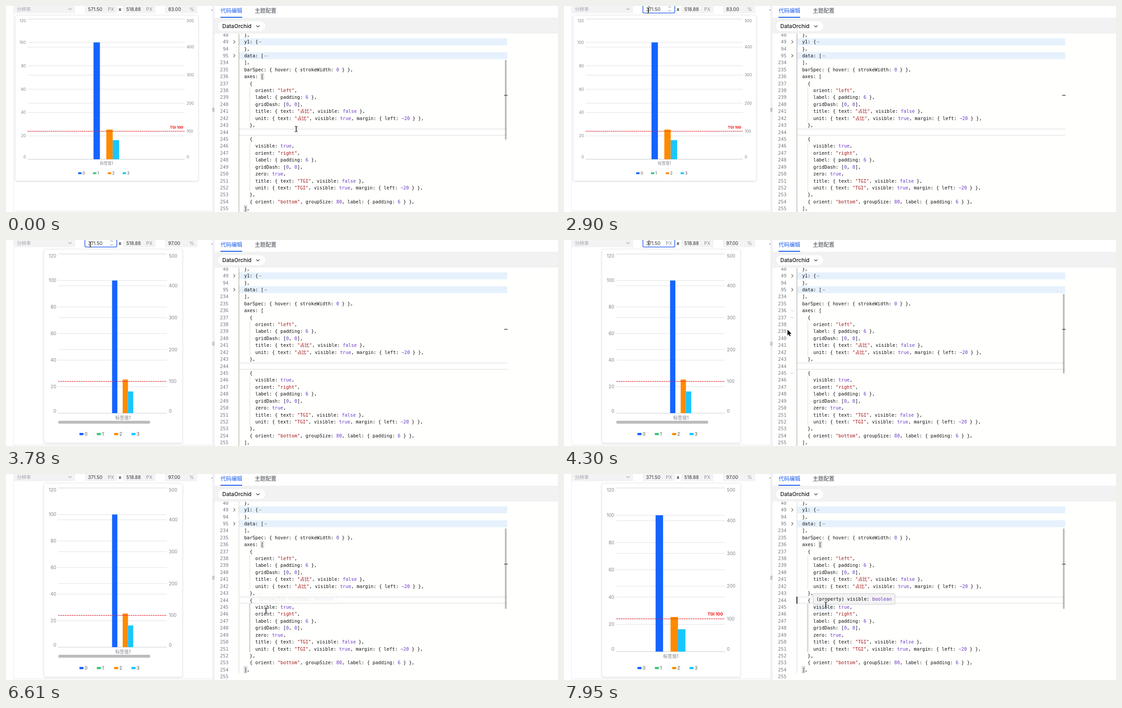
Animation, 1225 px wide and 457 px high, one loop 8000 ms. Source, as an HTML page with a canvas:

```html
<!DOCTYPE html>
<html lang="zh">
<head>
<meta charset="utf-8">
<style>
html, body { margin: 0; width: 100%; height: 100%; overflow: hidden; background: #fff; }
canvas { display: block; }
</style>
</head>
<body>
<canvas id="stage" width="1225" height="457"></canvas>
<script>
const ctx = document.getElementById('stage').getContext('2d');
const LOOP = 8000, STEP = 60;
const UI = 'Inter, "Noto Sans CJK SC", "Noto Sans CJK", sans-serif';
const MONO = '10.3px "DejaVu Sans Mono", "Noto Sans CJK SC", "Noto Sans CJK", monospace';
const ROW = 15.42, FIRST_ROW = 64, COL = 6.2, CODE_X = 516;
const PURPLE = '#6a38c8', BLUE = '#1664ff';

// Moments at which the state changes
const T = { focus: 1560, select: 2480, type: 2900, resize: 3070, leave: 3800,
            click: 4850, remove: 5950, rebuild: 7009 };

const HEAD = ['},', 'y1: {', '},', 'data: [', '],',
  'barSpec: { hover: { strokeWidth: 0 } },', 'axes: [', '  {', '    orient: "left",',
  '    label: { padding: 6 },', '    gridDash: [0, 0],',
  '    title: { text: "占比", visible: false },',
  '    unit: { text: "占比", visible: true, margin: { left: −20 } },', '  },'];
const TAIL = ['  {', '    visible: true,', '    orient: "right",', '    label: { padding: 6 },',
  '    gridDash: [0, 0],', '    zero: true,', '    title: { text: "TGI", visible: false },',
  '    unit: { text: "TGI", visible: true, margin: { left: −20 } },', '  },',
  '  { orient: "bottom", groupSize: 80, label: { padding: 6 } },', '],'];

const SERIES = [['0', BLUE, 100], ['1', '#3cc780', 0], ['2', '#ff8a00', 25.4], ['3', '#1ac6ff', 16.4]];
const WIDE = { card: [20.5, 20.5, 406, 367.5], x0: 48, x1: 397, top: 29, base: 340, size: 8.57,
  bar: 194.2, barW: 14.2, cat: [223, 349], legend: [160, 371, 32.9], mark: [393.5, 268.7], zoom: '83.00' };
const NARROW = { card: [84, 20.5, 307.5, 429.5], x0: 116, x1: 357, top: 31, base: 384.3, size: 10,
  bar: 235.4, barW: 11.75, cat: [259.5, 394.3], legend: [163, 430.5, 38.5], slider: true, zoom: '97.00' };
const REBUILT = { ...NARROW, base: 394, bar: 203.3, barW: 16.55, cat: [237, 404.5],
  slider: false, mark: [353, 311] };

const POINTER = [[0, 644, 273], [470, 644, 273], [590, 677, 298], [830, 677, 298], [1200, 390, 170],
  [1590, 184, 10], [1760, 187, 10], [3780, 187, 10], [4040, 350, 90], [4300, 496, 199],
  [4600, 570, 284], [4750, 561, 283], [6190, 561, 283], [6310, 577, 303], [6720, 577, 303],
  [7010, 549, 268], [7200, 549, 268], [7470, 581, 290], [LOOP, 581, 290]];

const clamp = v => Math.max(0, Math.min(1, v));
const ramp = (t, from, to) => clamp((t - from) / (to - from));
const stepped = (t, from, to) => ramp(from + Math.floor((t - from) / STEP) * STEP, from, to);
const mix = (a, b, p) => a + (b - a) * p;
const blinkOn = (t, start) => Math.floor((t - start) / 500) % 2 === 0;

function rect(x, y, w, h, color) {
  ctx.fillStyle = color;
  ctx.fillRect(x, y, w, h);
}
function round(x, y, w, h, r, fill, stroke, lw = 1) {
  ctx.beginPath();
  ctx.roundRect(x, y, w, h, r);
  if (fill) { ctx.fillStyle = fill; ctx.fill(); }
  if (stroke) { ctx.strokeStyle = stroke; ctx.lineWidth = lw; ctx.stroke(); }
}
function path(points, color, lw = 1) {
  ctx.beginPath();
  points.forEach(([x, y]) => ctx.lineTo(x, y));
  ctx.strokeStyle = color;
  ctx.lineWidth = lw;
  ctx.stroke();
}
function text(s, x, y, font, color, align = 'left') {
  ctx.font = font;
  ctx.fillStyle = color;
  ctx.textAlign = align;
  ctx.textBaseline = 'alphabetic';
  ctx.fillText(s, x, y + parseFloat(font.match(/[\d.]+px/)[0]) * 0.36);
}
function chevron(x, y, r, color, lw = 1, right = false) {
  path(right ? [[x - r / 2, y - r], [x + r / 2, y], [x - r / 2, y + r]]
             : [[x - r, y - r / 2], [x, y + r / 2], [x + r, y - r / 2]], color, lw);
}
function faded(alpha, draw) {
  if (alpha <= 0) return;
  ctx.save();
  ctx.globalAlpha = alpha;
  draw();
  ctx.restore();
}

function pointerAt(t) {
  const i = POINTER.findIndex(p => p[0] > t);
  const [t0, x0, y0] = POINTER[i - 1], [t1, x1, y1] = POINTER[i];
  const p = stepped(t, t0, t1);
  return [mix(x0, x1, p), mix(y0, y1, p)];
}

function drawInput(x, value, unit) {
  rect(x, 0, 71.5, 16, '#f3f3f4');
  text(value, x + 7, 6.8, `10.4px ${UI}`, '#333');
  if (unit) text(unit, x + (unit === '%' ? 54 : 51), 6.8, `10.4px ${UI}`, '#8a8f99');
}

function drawToolbar(t, layout, mouse) {
  rect(16, 0, 137.5, 16, '#f3f3f4');
  text('分辨率', 24, 6.8, `10.33px ${UI}`, '#a2a5ab');
  chevron(142, 6.8, 3.6, '#777');

  const hover = mouse[0] > 175 && mouse[0] < 246 && mouse[1] < 16;
  const focused = t >= T.focus && t < T.click;
  const width = t < T.type ? '571.50' : '371.50';
  drawInput(175, width, hover ? '' : 'PX');
  drawInput(260, '518.88', 'PX');
  drawInput(353, layout.zoom, '%');
  text('x', 253, 6.8, `600 10.4px ${UI}`, '#222', 'center');
  rect(456.5, 8, 1.8, 1.8, '#444');

  if (focused) {
    faded(mix(0.5, 1, ramp(t, T.focus, 1700)), () =>
      round(175.2, -4, 70.6, 19.6, 2, '#fff', '#2b63f0', 1.5));
    if (t >= T.select && t < T.type) rect(182, 0, 6.6, 13.5, '#b3d4fd');
    text(width, 182, 6.8, `10.4px ${UI}`, '#333');
    if (!hover) text('PX', 226, 6.8, `10.4px ${UI}`, '#8a8f99');
    const caretOn = t < T.select ? blinkOn(t, T.focus) : t >= T.type && blinkOn(t, T.type);
    if (caretOn) rect(t < T.select ? 182 : 188, 0, 1, 13, '#111');
  }
  if (hover) {
    path([[231.5, 4], [234.5, 1], [237.5, 4]], '#777');
    path([[231.5, 9], [234.5, 12], [237.5, 9]], '#777');
  }
}

function drawBars(t, c) {
  let { bar, barW, base, top } = c, grow = 1;
  if (c === NARROW) {
    // Bars travel from the rescaled wide layout to the narrow one
    const p = stepped(t, T.resize, T.resize + 320);
    bar = mix(286.4, bar, p);
    barW = mix(16.6, barW, p);
    base = mix(394.5, base, p);
    top = mix(31, top, p);
  }
  if (c === REBUILT) grow = Math.max(0.006, stepped(t, T.rebuild, T.rebuild + 300));
  ctx.save();
  ctx.beginPath();
  ctx.rect(c.x0, c.top, c.x1 - c.x0, c.base - c.top);
  ctx.clip();
  SERIES.forEach(([, color, value], i) => {
    const h = (base - top) * value / 120 * grow;
    rect(bar + i * barW, base - h, barW, h, color);
  });
  ctx.restore();
}

function drawChart(t, c) {
  const font = `${c.size}px ${UI}`, k = c.size / 10;
  ctx.save();
  ctx.shadowColor = 'rgba(0,0,0,0.16)';
  ctx.shadowBlur = 4;
  ctx.shadowOffsetY = 1;
  round(...c.card, 4, '#fff');
  ctx.restore();
  round(...c.card, 4, null, '#e8e8ea', 0.8);

  const height = c.base - c.top;
  const axis = (max, step, x, align) => {
    for (let v = 0; v <= max; v += step) {
      const y = c.base - height * v / max;
      path([[c.x0, y], [c.x1, y]], v ? '#dfe0e3' : '#d5d7da', 1);
      const shift = v === 0 ? -5.4 * k : v === max ? 4.7 * k : 0;
      text(v, x, y + shift, font, '#7d8088', align);
    }
  };
  axis(120, 20, c.x0 - 4.5 * k, 'right');
  axis(500, 100, c.x1 + 4.6 * k, 'left');
  drawBars(t, c);

  const markY = c.base - height / 5;
  ctx.save();
  ctx.setLineDash([3.34 * k, 1.67 * k]);
  path([[c.x0, markY], [c.x1, markY]], '#e6202a', 1.35 * k);
  ctx.restore();
  if (c.mark) text('TGI 100', ...c.mark, `bold ${9.4 * k}px ${UI}`, '#f01818', 'right');

  text('标签值1', ...c.cat, font, '#7d8088', 'center');
  if (c.slider) round(116, 401, 204, 6.4, 3.2, '#bcbcbc');
  const [lx, ly, gap] = c.legend;
  SERIES.forEach(([name, color], i) => {
    round(lx + i * gap, ly - 2.4 * k, 9 * k, 4.8 * k, 0.8, color);
    text(name, lx + i * gap + 11.6 * k, ly, font, '#555');
  });
}

function drawHeader() {
  rect(458, 0, 5, 457, '#f0f1f3');
  for (let i = 0; i < 6; i++) rect(458.2 + (i % 2) * 2.6, 226.4 + (i >> 1) * 3, 1.4, 1.4, '#555');
  rect(463, 0, 762, 26, '#fff');
  text('代码编辑', 476.3, 10.3, `500 12px ${UI}`, '#1a5cf0');
  text('主题配置', 552, 10.3, `12px ${UI}`, '#41464f');
  rect(463, 26, 762, 35.5, '#f2f2f3');
  rect(476, 24, 48, 2, '#1a5cf0');
  round(471, 34, 104, 21.5, 10.7, '#fff');
  text('DataOrchid', 480, 45, `500 12px ${UI}`, '#15171c');
  chevron(559, 45, 3.4, '#333', 1.3);
}

function drawCode(line, x, y) {
  ctx.font = MONO;
  for (const [token] of line.matchAll(/"[^"]*"|\b(?:true|false|boolean)\b|−?\b\d+|[A-Za-z]\w*|./g)) {
    const color = token[0] === '"' ? '#a31515'
      : /^(true|false|boolean|−?\d+)$/.test(token) ? PURPLE : '#111';
    text(token, x, y, MONO, color);
    x += ctx.measureText(token).width;
  }
}

function drawEditor(t) {
  const removed = t >= T.remove;
  const rows = [...HEAD, ...(removed ? [] : ['']), ...TAIL, ...(removed ? [''] : [])];
  const rowY = i => FIRST_ROW + i * ROW;
  const focused = t < T.focus || t >= T.click;

  ctx.save();
  ctx.beginPath();
  ctx.rect(463, 61.5, 762, 396);
  ctx.clip();
  rect(463, 61, 762, 396, '#fffffe');

  for (const i of [1, 3]) {
    rect(517, rowY(i) - ROW / 2, 595.5, ROW, '#e6f1fd');
    chevron(506.5, rowY(i), 3.6, '#555', 1.1, true);
  }
  for (const edge of [0.8, ROW - 0.8])
    rect(517, rowY(14) - ROW / 2 + edge - 0.8, 595.5, 1.6, '#e6e6e6');

  const guide = (x, from, to, active) =>
    rect(x, rowY(from) - ROW / 2, 1, (to - from + 1) * ROW, active ? '#939393' : '#d6d6d6');
  guide(516.4, 0, removed ? 24 : 25, !removed);
  guide(540.6, 8, 12, false);
  guide(540.6, removed ? 15 : 16, removed ? 21 : 22, removed);

  if (focused) {
    const bracket = (col, i) =>
      round(CODE_X + col * COL, rowY(i) - 7.3, 6.2, 14.4, 0, '#ececec', '#b9b9b9', 0.9);
    bracket(8, 6);
    bracket(2, removed ? 24 : 25);
  }

  const tip = Math.max(ramp(t, 6600, 6700) - ramp(t, 6740, 6840), ramp(t, 7800, 7940));
  if (removed) faded(tip, () => rect(553.2, rowY(15) - ROW / 2, 43.4, ROW, '#eef5fd'));

  rows.forEach((line, i) => {
    const number = i < 2 ? 48 + i : i < 4 ? 92 + i : 230 + i;
    text(number, 493.6, rowY(i), MONO, '#717a83', 'right');
    drawCode(line, CODE_X + 2 * COL, rowY(i));
  });
  text('⋯', 561, rowY(1), MONO, '#888');
  text('⋯', 573.5, rowY(3), MONO, '#888');

  const folds = ramp(t, 4180, 4300) - ramp(t, 4460, 4800);
  faded(folds * 0.6, () => [6, 7, 15].forEach(i => chevron(506.5, rowY(i), 3.8, '#999')));

  const caretStart = t < T.focus ? 60 : t < T.remove ? T.click : T.remove;
  if (focused && blinkOn(t, caretStart))
    rect(removed ? 516 : 540, rowY(14) - ROW / 2, 1.8, ROW, '#000');

  rect(1105.5, removed ? 199 : 197.3, 7.5, 1.8, '#555');
  const thumb = t < T.leave ? 1 - ramp(t, 850, 1640) : ramp(t, 4200, 4300);
  faded(thumb, () =>
    rect(1107.2, removed ? 121 : 120, 3.6, removed ? 178 : 176, 'rgba(100,100,100,0.45)'));

  faded(tip, () => {
    round(552.8, 265.5, 181.6, 23.6, 1, '#f3f3f3', '#c8c8c8');
    drawCode('(property) visible: boolean', 560, 277.4);
  });
  ctx.restore();
}

function drawPointer([x, y]) {
  ctx.save();
  ctx.translate(x, y);
  ctx.lineJoin = 'round';
  const overText = x > 517 || (x > 175 && x < 246 && y < 16);
  if (overText) {
    const beam = (color, lw) => {
      for (const side of [-1, 1])
        path([[3.2 * side, -6.2], [side, -5.7], [0, -4.5], [0, 4.5], [side, 5.7], [3.2 * side, 6.2]],
          color, lw);
    };
    beam('#fff', 2.6);
    beam('#111', 1.1);
  } else {
    ctx.beginPath();
    [[0, 0], [0, 12.6], [2.9, 10], [4.8, 14.4], [6.8, 13.5], [4.9, 9.2], [8.8, 9]]
      .forEach(p => ctx.lineTo(...p));
    ctx.closePath();
    ctx.strokeStyle = '#fff';
    ctx.lineWidth = 2;
    ctx.stroke();
    ctx.fillStyle = '#000';
    ctx.fill();
  }
  ctx.restore();
}

function render(t) {
  const layout = t < T.resize ? WIDE : t < T.rebuild ? NARROW : REBUILT;
  const mouse = pointerAt(t);
  rect(0, 0, 1225, 457, '#fff');
  rect(16, 16, 1, 439, '#ececee');
  rect(16, 454, 442, 1, '#e6e6e8');
  drawToolbar(t, layout, mouse);
  drawChart(t, layout);
  drawHeader();
  drawEditor(t);
  drawPointer(mouse);
}

const start = performance.now();
function tick() {
  render((performance.now() - start) % LOOP);
  requestAnimationFrame(tick);
}
tick();
</script>
</body>
</html>
```
